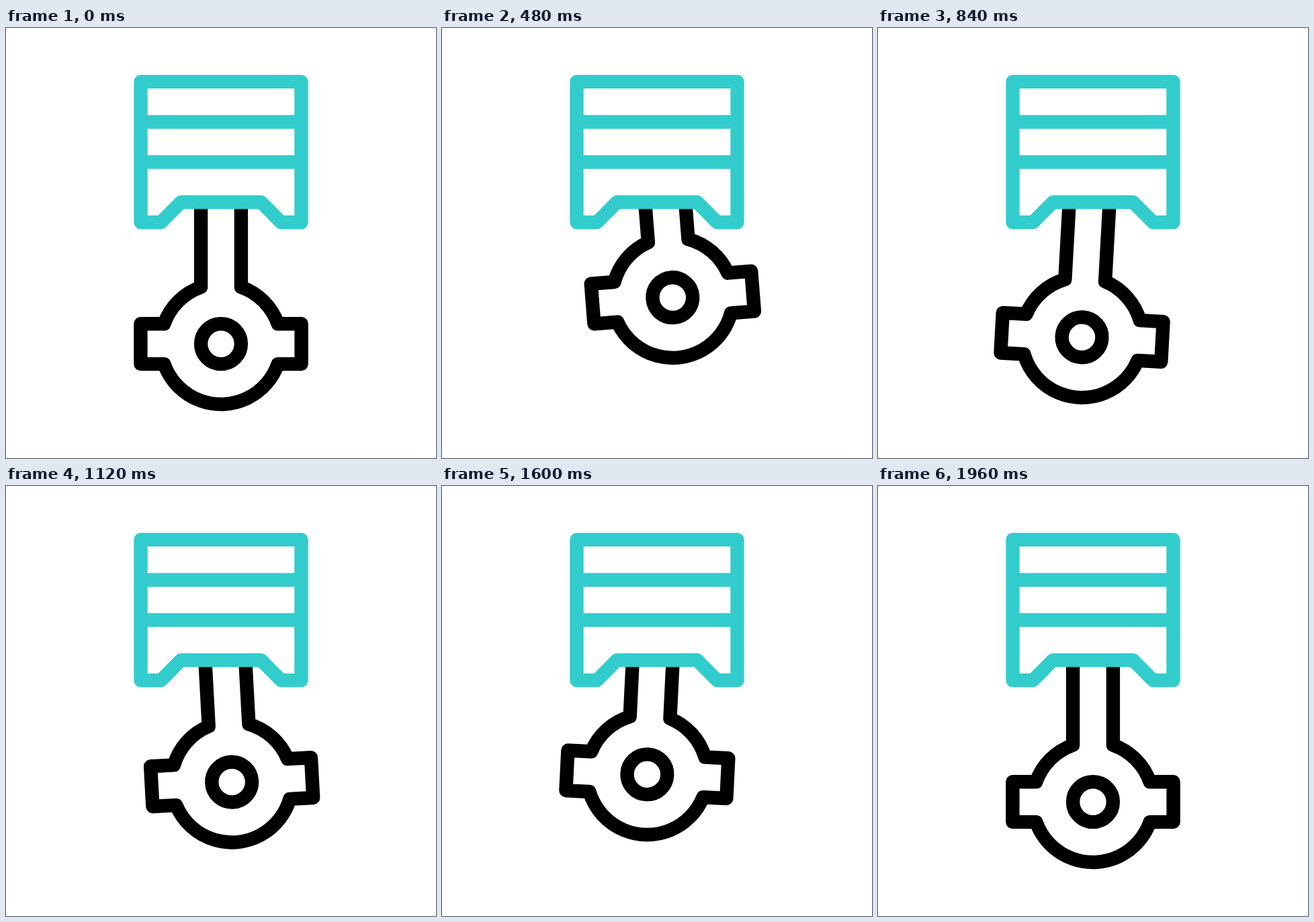
Recreate the animation shown at these times as an HTML page with a canvas. Size 640 by 640 pixels, loop 2 s.

```html
<!DOCTYPE html>
<html lang="en">
<head>
<meta charset="utf-8">
<title>Piston</title>
<style>
html, body { margin: 0; width: 100%; height: 100%; overflow: hidden; background: #fff; }
canvas { display: block; width: 640px; height: 640px; }
</style>
</head>
<body>
<canvas id="stage" width="640" height="640"></canvas>
<script>
const ctx = document.getElementById('stage').getContext('2d');
const LOOP = 2000, STEP = 40;
const CX = 320, PIN_Y = 173, ROD = 297.2;
const TEAL = '#33cccc';

// Keys: [time, value, ease-out handle, ease-in handle] for the span after the key.
const SWING = [
  [80, 0], [434, 27], [722, -27, 0.155, 0.583],
  [1340, 27], [1717, -27], [1960, 0]
];
const LIFT = [
  [80, 0], [523, 70], [950, 0],
  [1333, 70, 0.24, 0.72], [1960, 0]
];
LIFT[1].push(0.333, 0.6);

function ease(p, a = 1 / 3, b = 2 / 3) {
  let lo = 0, hi = 1, u = p;
  for (let i = 0; i < 30; i++) {
    u = (lo + hi) / 2;
    const v = 1 - u;
    const x = 3 * a * u * v * v + 3 * b * u * u * v + u * u * u;
    if (x < p) lo = u; else hi = u;
  }
  return u * u * (3 - 2 * u);
}

function valueAt(keys, t) {
  if (t <= keys[0][0]) return keys[0][1];
  for (let i = 1; i < keys.length; i++) {
    const [t0, v0, a, b] = keys[i - 1];
    const [t1, v1] = keys[i];
    if (t < t1) return v0 + (v1 - v0) * ease((t - t0) / (t1 - t0), a, b);
  }
  return keys[keys.length - 1][1];
}

function line(points, close) {
  ctx.beginPath();
  points.forEach(([x, y]) => ctx.lineTo(x, y));
  if (close) ctx.closePath();
  ctx.stroke();
}

function drawRod(t) {
  const angle = -Math.asin(valueAt(SWING, t) / ROD);
  const r = 89.8, half = 29.9, arm = 119.6;
  const side = Math.asin(half / r);
  const up = Math.PI / 2;

  ctx.save();
  ctx.beginPath();
  ctx.rect(0, 260, 640, 380);
  ctx.clip();
  ctx.translate(CX, PIN_Y - valueAt(LIFT, t));
  ctx.rotate(angle);
  ctx.translate(0, ROD);
  ctx.strokeStyle = '#000';

  ctx.beginPath();
  ctx.moveTo(half, -260);
  ctx.arc(0, 0, r, -up + side, -side);
  ctx.lineTo(arm, -half);
  ctx.lineTo(arm, half);
  ctx.arc(0, 0, r, side, Math.PI - side);
  ctx.lineTo(-arm, half);
  ctx.lineTo(-arm, -half);
  ctx.arc(0, 0, r, Math.PI + side, Math.PI + up - side);
  ctx.lineTo(-half, -260);
  ctx.stroke();

  ctx.beginPath();
  ctx.arc(0, 0, half, 0, Math.PI * 2);
  ctx.stroke();
  ctx.restore();
}

function drawPiston() {
  const l = 200.5, r = 439.5;
  ctx.strokeStyle = TEAL;
  line([
    [l, 79.9], [r, 79.9], [r, 289.2], [409.3, 289.2],
    [379.8, 259.3], [260.2, 259.3], [230.7, 289.2], [l, 289.2]
  ], true);
  line([[l, 139.8], [r, 139.8]]);
  line([[l, 199.5], [r, 199.5]]);
}

function draw(now) {
  const t = Math.floor((now % LOOP) / STEP) * STEP;
  ctx.fillStyle = '#fff';
  ctx.fillRect(0, 0, 640, 640);
  ctx.lineWidth = 20.4;
  ctx.lineJoin = 'round';
  drawRod(t);
  drawPiston();
}

const start = performance.now();
function tick() {
  draw(performance.now() - start);
  requestAnimationFrame(tick);
}
tick();
</script>
</body>
</html>
```
